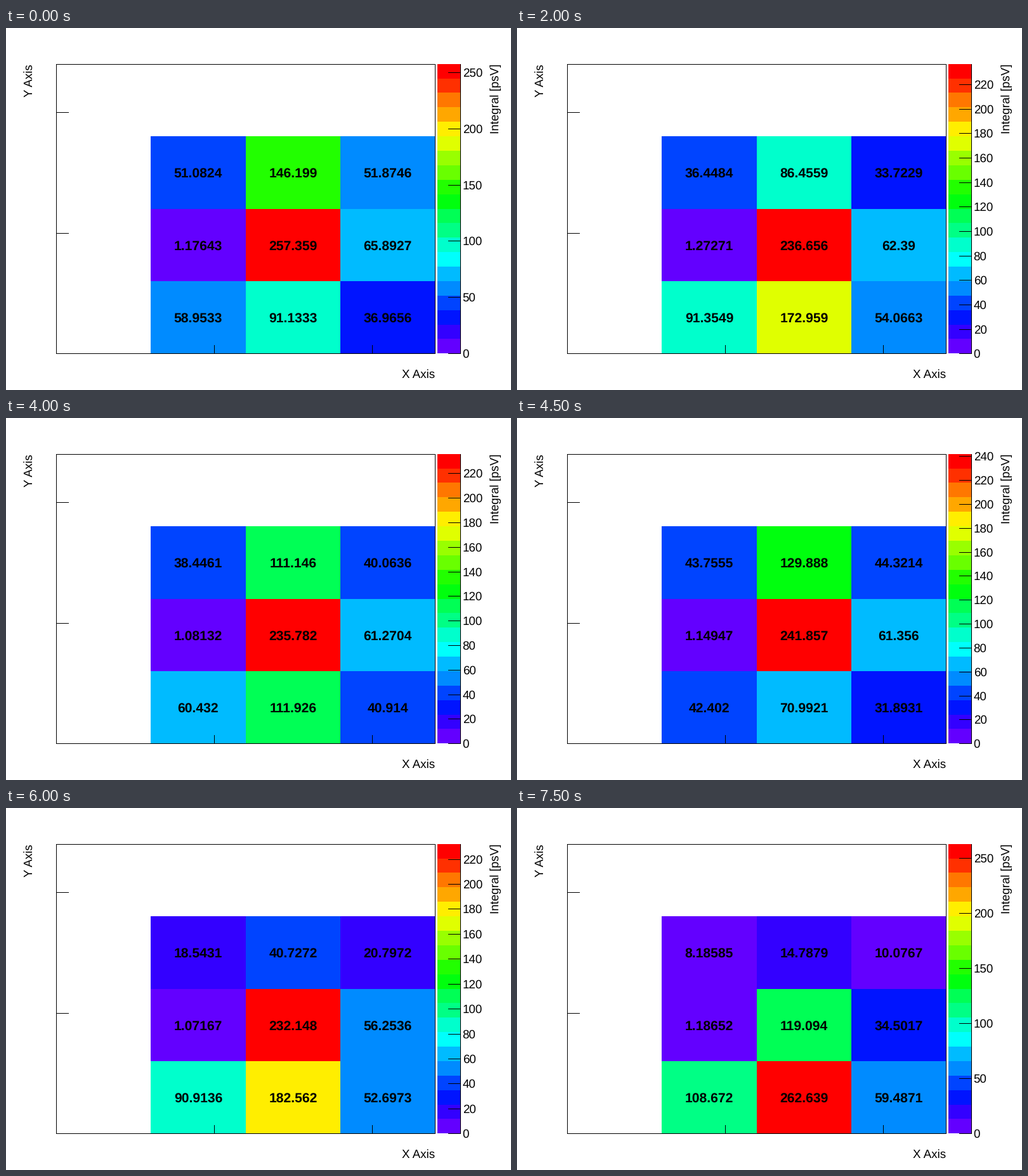
Recreate the animation shown at these times as a matplotlib script. Size 796 by 572 pixels, loop 8 s.

```python
import colorsys
from math import floor

import matplotlib.pyplot as plt
import numpy as np
from matplotlib.animation import FuncAnimation
from matplotlib.patches import Rectangle

W, H, DPI = 796, 572, 64
STEPS, STEP_MS = 16, 500
LEVELS, HUES = 20, 50
LEFT, RIGHT = 0.1 * W, 0.85 * W
TOP, BOTTOM = 0.1 * H, 0.9 * H

# Key poses of the scan: time in seconds, then the cells from the top left.
POSES = {
    0.0: "51.0824 146.199 51.8746 1.17643 257.359 65.8927 58.9533 91.1333 36.9656",
    1.0: "56.2443 149.251 49.6663 1.46644 254.186 65.4508 55.0441 84.5344 35.2804",
    3.0: "18.7947 37.5689 22.093 0.999729 223.028 59.6614 116.344 235.794 67.4132",
    4.5: "43.7555 129.888 44.3214 1.14947 241.857 61.356 42.402 70.9921 31.8931",
    5.5: "25.184 59.2768 25.2867 1.2671 242.851 57.4538 71.2891 132.374 43.5514",
    6.5: "13.5528 29.2023 17.7304 0.897651 209.962 53.2034 107.121 229.251 60.286",
    7.5: "8.18585 14.7879 10.0767 1.18652 119.094 34.5017 108.672 262.639 59.4871",
}
TIMES = np.array(list(POSES))
VALUES = np.array([row.split() for row in POSES.values()], dtype=float)
SLOPES = np.gradient(VALUES, TIMES, axis=0)


def readings(t):
    """Cell values at time t on a smooth Hermite curve through the poses."""
    k = min(np.searchsorted(TIMES, t, side="right") - 1, len(TIMES) - 2)
    span = TIMES[k + 1] - TIMES[k]
    u = (t - TIMES[k]) / span
    blend = u * u * (3 - 2 * u)
    bend = u * (1 - u) * ((1 - u) * SLOPES[k] - u * SLOPES[k + 1])
    return (1 - blend) * VALUES[k] + blend * VALUES[k + 1] + span * bend


def level_color(level):
    """Rainbow from violet to red, sampled at evenly spaced levels."""
    index = int((level + 0.99) * HUES / LEVELS)
    hue = 280 * (1 - (index + 1) / HUES)
    return colorsys.hls_to_rgb(hue / 360, 0.5, 1)


def px(value):
    return floor(value + 1e-6)


def at_x(part):
    return px(LEFT + (RIGHT - LEFT) * part)


def at_y(part):
    return px(BOTTOM - (BOTTOM - TOP) * part)


plt.rcParams["font.family"] = "Liberation Sans"
plt.rcParams["text.hinting"] = "none"
fig = plt.figure(figsize=(W / DPI, H / DPI), dpi=DPI, facecolor="white")
ax = fig.add_axes([0, 0, 1, 1])
ax.set_xlim(0, W)
ax.set_ylim(H, 0)
ax.axis("off")


def box(x0, y0, x1, y1, color="black", z=1):
    patch = Rectangle((x0, y0), x1 - x0, y1 - y0, facecolor=color,
                      linewidth=0, antialiased=False, zorder=z)
    return ax.add_patch(patch)


def hline(x0, x1, y):
    return box(x0, y, x1 + 1, y + 1, z=3)


def vline(x, y0, y1):
    return box(x, y0, x + 1, y1 + 1, z=3)


def label(x, y, text="", size=18.8, **kw):
    return ax.text(x, y, text, fontsize=size * 72 / DPI, va="baseline",
                   rotation_mode="anchor", zorder=4, **kw)


# Plot frame, axis ticks and titles
for part in (0, 1):
    hline(at_x(0), at_x(1), at_y(part))
    vline(at_x(part), at_y(1), at_y(0))
for part in (5 / 12, 10 / 12):
    hline(at_x(0), at_x(0) + 19, at_y(part))
    vline(at_x(part), at_y(0) - 13, at_y(0))
label(at_x(1), 553, "X Axis", ha="right")
label(42, at_y(1), "Y Axis", ha="right", rotation=90)
label(777, at_y(1), "Integral [psV]", ha="right", rotation=90)

# Colour scale
BAR_LEFT, BAR_RIGHT = 680, 716
PALETTE = [level_color(k) for k in range(LEVELS)]
for k, color in enumerate(PALETTE):
    box(BAR_LEFT, at_y((k + 1) / LEVELS), BAR_RIGHT, at_y(k / LEVELS), color)
vline(BAR_RIGHT, at_y(1), at_y(0))
ticks = [(hline(BAR_RIGHT - 19, BAR_RIGHT, 0),
          label(BAR_RIGHT + 3.6, 0, str(gap), ha="left"))
         for gap in range(14)]

# Heat map: the lower right 3 x 3 of a 4 x 4 grid
cells = []
for row in (3, 2, 1):
    for col in (1, 2, 3):
        x0, x1 = at_x(col / 4), at_x((col + 1) / 4)
        y0, y1 = at_y(row / 4), at_y((row - 1) / 4)
        text = label((x0 + x1) / 2, (y0 + y1) // 2 + 8, size=21.1,
                     ha="center", weight="bold")
        cells.append((box(x0, y0, x1, y1), text))


def draw(step):
    values = readings(step * STEP_MS / 1000)
    top = values.max()
    for (patch, text), value in zip(cells, values):
        level = min(int(0.01 + value / top * LEVELS), LEVELS - 1)
        patch.set_facecolor(PALETTE[level])
        text.set_text(f"{value:.6g}")

    gap = 50 if top > 250 else 20
    for k, (line, text) in enumerate(ticks):
        value = k * gap
        shown = value <= top
        line.set_visible(shown)
        text.set_visible(shown)
        y = at_y(value / top)
        line.set_y(y)
        text.set_y(y + 7)
        text.set_text(str(value))
    return []


anim = FuncAnimation(fig, draw, frames=STEPS, interval=STEP_MS,
                     repeat=True, repeat_delay=0, blit=False)
plt.show()
```
